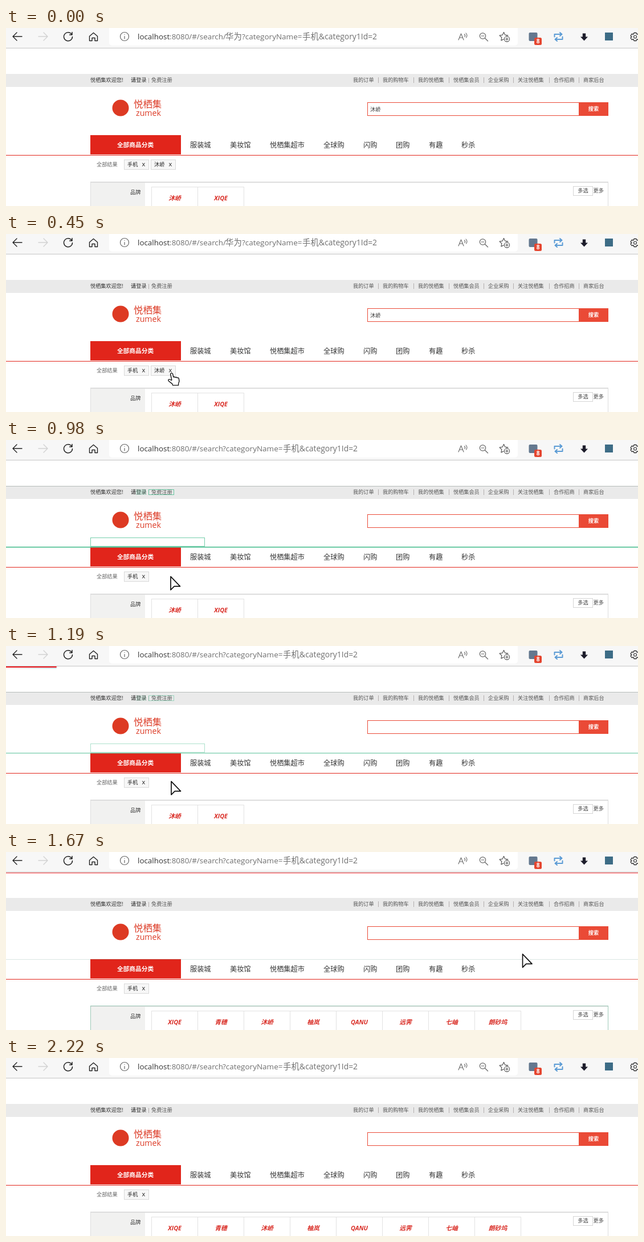
An HTML page with a canvas that plays this animation: 1109x314 px, repeating every 2.54 s.

```html
<!DOCTYPE html>
<html lang="zh-CN">
<head>
<meta charset="utf-8">
<style>
html, body { margin: 0; width: 100%; height: 100%; overflow: hidden; background: #fff; }
canvas { display: block; width: 1109px; height: 314px; }
</style>
</head>
<body>
<canvas id="stage" width="1109" height="314"></canvas>
<script>
const ctx = document.getElementById('stage').getContext('2d');
const W = 1109, LOOP = 2540;
const CJK = '"Noto Sans CJK SC", "Noto Sans CJK", sans-serif';
const LATIN = '"Open Sans", "Noto Sans", "Noto Sans CJK SC", sans-serif';
const RED = '#e1251b', ORANGE = '#ea4a36';

// Moments of the interaction, in ms
const HAND = 430, HOVER = 500, CLICK = 960, LOADED = 1390, FADE = 1610, GONE = 2215;

const SHOP = '悦栖集';
const PICK = '沐峤';
const BRANDS = ['XIQE', '青穗', PICK, '柚岚', 'QANU', '远霁', '七岫', '朗砂坞'];
const LINKS = [[609, '我的订单'], [661, '我的购物车'], [723, '我的' + SHOP], [785, SHOP + '会员'],
  [846, '企业采购'], [898, '关注' + SHOP], [961, '合作招商'], [1013, '商家后台']];
const NAV = [[323, '服装城'], [393, '美妆馆'], [463, SHOP + '超市'], [557, '全球购'],
  [627, '闪购'], [684, '团购'], [742, '有趣'], [799, '秒杀']];

// Pointer tip: time, x, y
const ENTER = [[60, 756, 301], [160, 640, 299], [260, 500, 291], [350, 385, 269],
  [450, 291, 245.5], [570, 290, 244], [720, 289, 243], [960, 289, 241]];
const LEAVE = [[960, 289, 241], [1130, 289, 240], [1190, 289, 239], [1310, 468, 213], [1430, 670, 179],
  [1550, 812, 172], [1670, 906, 180], [1930, 1012, 214], [2190, 1100, 255]];

const clamp = v => Math.max(0, Math.min(1, v));

// Cubic Hermite interpolation through timed points
function along(pts, t) {
  const last = pts.length - 1;
  if (t <= pts[0][0]) return pts[0].slice(1);
  if (t >= pts[last][0]) return pts[last].slice(1);
  const i = pts.findIndex(p => p[0] > t) - 1;
  const a = pts[i], b = pts[i + 1], p = pts[Math.max(0, i - 1)], n = pts[Math.min(last, i + 2)];
  const d = b[0] - a[0], u = (t - a[0]) / d, u2 = u * u, u3 = u2 * u;
  return [1, 2].map(k => {
    const m0 = (b[k] - p[k]) / (b[0] - p[0]) * d, m1 = (n[k] - a[k]) / (n[0] - a[0]) * d;
    return (2 * u3 - 3 * u2 + 1) * a[k] + (u3 - 2 * u2 + u) * m0 + (3 * u2 - 2 * u3) * b[k] + (u3 - u2) * m1;
  });
}

// CSS "ease": cubic-bezier(.25, .1, .25, 1)
function ease(x) {
  x = clamp(x);
  let lo = 0, hi = 1;
  for (let i = 0; i < 20; i++) {
    const s = (lo + hi) / 2, q = 1 - s;
    if (.75 * q * q * s + .75 * q * s * s + s * s * s < x) lo = s; else hi = s;
  }
  const q = 1 - lo;
  return .3 * q * q * lo + 3 * q * lo * lo + lo ** 3;
}

function rect(x, y, w, h, color) {
  ctx.fillStyle = color;
  ctx.fillRect(x, y, w, h);
}

function box(x, y, w, h, color, fill) {
  if (fill) rect(x, y, w, h, fill);
  ctx.strokeStyle = color;
  ctx.lineWidth = 1;
  ctx.strokeRect(x + .5, y + .5, w - 1, h - 1);
}

function text(s, x, midY, size, color, opt = {}) {
  ctx.font = `${opt.style || ''} ${size}px ${opt.font || CJK}`;
  ctx.textAlign = opt.align || 'left';
  ctx.fillStyle = color;
  ctx.fillText(s, x, midY + size * .37);
  return ctx.measureText(s).width;
}

function path(d, x, y, stroke, width = 1.3, fill) {
  const p = new Path2D(d);
  ctx.save();
  ctx.translate(x, y);
  ctx.lineJoin = ctx.lineCap = 'round';
  if (fill) { ctx.fillStyle = fill; ctx.fill(p); }
  if (stroke) { ctx.strokeStyle = stroke; ctx.lineWidth = width; ctx.stroke(p); }
  ctx.restore();
}

function round(x, y, w, h, r, color) {
  ctx.beginPath();
  ctx.roundRect(x, y, w, h, r);
  ctx.fillStyle = color;
  ctx.fill();
}

function address(cleared) {
  const gray = '#6f6f6f', latin = { font: LATIN }, y = 15;
  const w = text('localhost', 231, y, 13.4, '#333', latin);
  text(':8080/#/search' + (cleared ? '' : '/'), 231 + w, y, 13.4, gray, latin);
  if (!cleared) text('华为', 385, y, 14.4, gray);
  const dx = cleared ? -34 : 0;
  text('?categoryName=', 414 + dx, y, 13.5, gray, latin);
  text('手机', 520 + dx, y, 14.4, gray);
  text('&category1Id=2', 549 + dx, y, 13.9, gray, latin);
}

function toolbar(cleared) {
  rect(0, 0, W, 35, '#f7f7f7');
  rect(0, 35, W, 1, '#c4c4c4');
  round(181, -8, 717, 39, 5, '#fff');

  const arrow = 'M16 0H0M7-7L0 0L7 7';
  path(arrow, 12, 15, '#222', 1.4);
  path('M0 0H16M9-7L16 0L9 7', 57, 15, '#d2d2d2', 1.4);
  path('M6.5-4A7.5 7.5 0 1 0 7.5 0M7-8V-3.6H2.6', 109, 15.5, '#222', 1.5);
  path('M-7-1L0-7L7-1V7H2.5V2H-2.5V7H-7Z', 153.5, 15.5, '#222', 1.4);
  path('M7.5 0A7.5 7.5 0 1 1 -7.5 0A7.5 7.5 0 1 1 7.5 0M0-.5V4M0-3.6V-3.5', 208, 15, '#666', 1.2);
  address(cleared);

  path('M0 11L4.5 0L9 11M1.7 7H7.3M10.5 1Q12.5 3 11 5.5M13-1Q16.5 3 13.5 7', 794, 10, '#666', 1.1);
  path('M5.2 0A5.2 5.2 0 1 1 -5.2 0A5.2 5.2 0 1 1 5.2 0M4 4L9 9M-2.5 0H2.5', 836.5, 14, '#666', 1.2);
  path('M5-1.5L7.5-2L2.3-2.7L0-7.5L-2.3-2.7L-7.5-2L-3.7 1.7L-4.6 7L-.5 4.9', 873.5, 15, '#555', 1.2);
  path('M4.6 0A4.6 4.6 0 1 1 -4.6 0A4.6 4.6 0 1 1 4.6 0M-2.4 0H2.4M0-2.4V2.4', 879, 19.5, '#555', 1.1, '#fff');

  round(917.5, 8, 15, 15, 2, '#64788f');
  round(927, 17, 13, 13, 2.5, '#e5452f');
  text('8', 933.5, 23.5, 10, '#fff', { align: 'center', font: LATIN, style: 'bold' });
  path('M1 8V3.5H13M10.5 .5L14 3.5L10.5 6.5M15 8V12.5H3M5.5 9.5L2 12.5L5.5 15.5', 961.5, 7.5, '#5b9bd5', 2);
  path('M-2.7-6H2.7V0H6.5L0 7L-6.5 0H-2.7Z', 1014.5, 15.5, null, 0, '#1d1d2b');
  round(1051, 8, 14, 14, 0, '#3d6c86');
  path('M-2-7H2L3-4.5L6-5L8-1.5L6 0L8 2L6 5L3 4.5L2 7H-2L-3 4.5L-6 5L-8 2L-6 0L-8-1.5L-6-5L-3-4.5Z', 1104, 15.5, '#333', 1.3);
  path('M2.5 0A2.5 2.5 0 1 1 -2.5 0A2.5 2.5 0 1 1 2.5 0', 1104, 15.5, '#333', 1.2);
}

function header(cleared) {
  rect(0, 81, W, 23, '#eaeaea');
  text(SHOP + '欢迎您!', 148, 92, 9.2, '#333');
  text('请', 219, 92, 9.2, '#111');
  text('登录', 228.2, 92, 9.2, '#333');
  rect(250, 88, 1, 9, '#b3aeae');
  text('免费注册', 255, 92, 9.2, '#555');
  LINKS.forEach(([x, s], i) => {
    text(s, x, 92, 9.15, '#555');
    if (i) rect(x - 8, 87, 1, 10, '#b3aeae');
  });

  ctx.beginPath();
  ctx.arc(201, 141, 14.5, 0, 7);
  ctx.fillStyle = '#dd3a23';
  ctx.fill();
  text(SHOP, 224, 134, 16.4, '#dc3b26');
  text('zumek', 228, 149.5, 14.2, '#dc3b26', { font: LATIN });

  box(634, 131, 372, 24, ORANGE, '#fff');
  rect(1005, 131, 52, 24, ORANGE);
  text('搜索', 1031, 143, 9.2, '#fff', { align: 'center', style: 'bold' });
  if (!cleared) text(PICK, 639, 143.5, 9.2, '#333');

  rect(148, 189, 159, 34, RED);
  text('全部商品分类', 227, 206, 10.7, '#fff', { align: 'center', style: 'bold' });
  NAV.forEach(([x, s]) => text(s, x, 206, 12.2, '#333'));
  rect(0, 224, W, 1, RED);
}

function chip(x, label, color) {
  box(x, 232, 44, 18, '#d9d9d9', '#f7f7f7');
  text(label, x + 6, 240.5, 9.2, color);
  text('x', x + 31.5, 240, 11, color, { font: LATIN });
}

function filters(t) {
  text('全部结果', 159, 240.5, 9.2, '#666');
  chip(207, '手机', '#222');
  if (t < CLICK) chip(254, PICK, t >= HOVER ? '#67b5df' : '#222');

  rect(148, 271, 909, 2, '#ddd');
  rect(148, 271, 1, 43, '#ddd');
  rect(1056, 271, 1, 43, '#ddd');
  rect(149, 273, 95, 41, '#f1f1f0');
  text('品牌', 218, 289.5, 9.2, '#333');
  const list = t < LOADED ? [PICK, BRANDS[0]] : BRANDS;
  list.forEach((name, i) => {
    box(255 + i * 81, 280, 82, 40, '#e2e2e2');
    const latin = /^[A-Z]/.test(name);
    text(name, 296 + i * 81, 300, 10.8, '#d92c25',
      { align: 'center', style: 'italic bold', font: latin ? LATIN : CJK });
  });
  box(995, 279, 35, 17, '#d5d5d5', '#fff');
  text('多选', 1012.5, 287, 9.2, '#444', { align: 'center' });
  text('更多', 1030.5, 287, 9.2, '#444');
}

// Repaint outlines that fade after each update
function flashes(t) {
  const first = t < CLICK ? 0 : clamp(1 - (t - CLICK) / 540);
  const second = t < LOADED ? 0 : clamp(1 - (t - LOADED) / 540);
  if (first) {
    const green = k => `rgba(75,190,145,${first * k})`;
    rect(0, 81, W, 1, `rgba(140,150,146,${Math.min(1, first * 4) * .55})`);
    box(148, 172, 201, 16, green(.8));
    box(250, 87, 45, 10, green(.85));
    rect(228, 87, 18, 10, green(.2));
    if (!second) rect(0, 188, W, 2, green(.85));
  }
  if (second) {
    rect(0, 189, W, 1, `rgba(80,135,118,${second * second * .9})`);
    ctx.strokeStyle = `rgba(45,165,118,${second * .75})`;
    ctx.strokeRect(148.5, 271.5, 908, 60);
  }
}

function progress(t) {
  if (t < CLICK + 30) return;
  const start = .08 * ease((t - CLICK - 30) / 150);
  const w = W * (start + .92 * ease((t - LOADED) / 200));
  const alpha = 1 - ease((t - FADE) / 200);
  if (alpha <= 0) return;
  ctx.save();
  ctx.globalAlpha = alpha;
  ctx.beginPath();
  ctx.rect(0, 36, W, 6);
  ctx.clip();
  if (w < W - 1) {
    const glow = ctx.createLinearGradient(w - 100, 0, w, 0);
    glow.addColorStop(0, 'rgba(34,153,221,0)');
    glow.addColorStop(1, 'rgba(34,153,221,.25)');
    rect(w - 100, 38, 100, 2, glow);
  }
  rect(0, 35, w, 3, '#f0161a');
  ctx.restore();
}

function pointer(t) {
  if (t < 60 || t >= GONE) return;
  const [x, y] = along(t < CLICK ? ENTER : LEAVE, t);
  if (t >= HAND && t < CLICK) {
    path('M-2 1.6Q-1.6 0 0 0Q1.6 0 2 1.6L3.2 7Q5 5.8 6.3 7.6Q8 6.4 9.4 8.3Q12.2 7.4 12.8 10L13.4 14.5L12 18.5L12 21.5H2L1.2 19L-5.3 13.8Q-6.4 11.8-4.6 11Q-3 10.7-1 12.4H.3Z',
      x, y, '#111', 1.4, '#fff');
  } else {
    path('M0 0V23.5L6.2 17.2H16.5Z', x, y, '#111', 1.7, '#fff');
  }
}

function draw(t) {
  const cleared = t >= CLICK;
  rect(0, 0, W, 314, '#fff');
  toolbar(cleared);
  header(cleared);
  filters(t);
  flashes(t);
  progress(t);
  pointer(t);
}

const begin = performance.now();
function tick() {
  draw((performance.now() - begin) % LOOP);
  requestAnimationFrame(tick);
}
tick();
</script>
</body>
</html>
```
